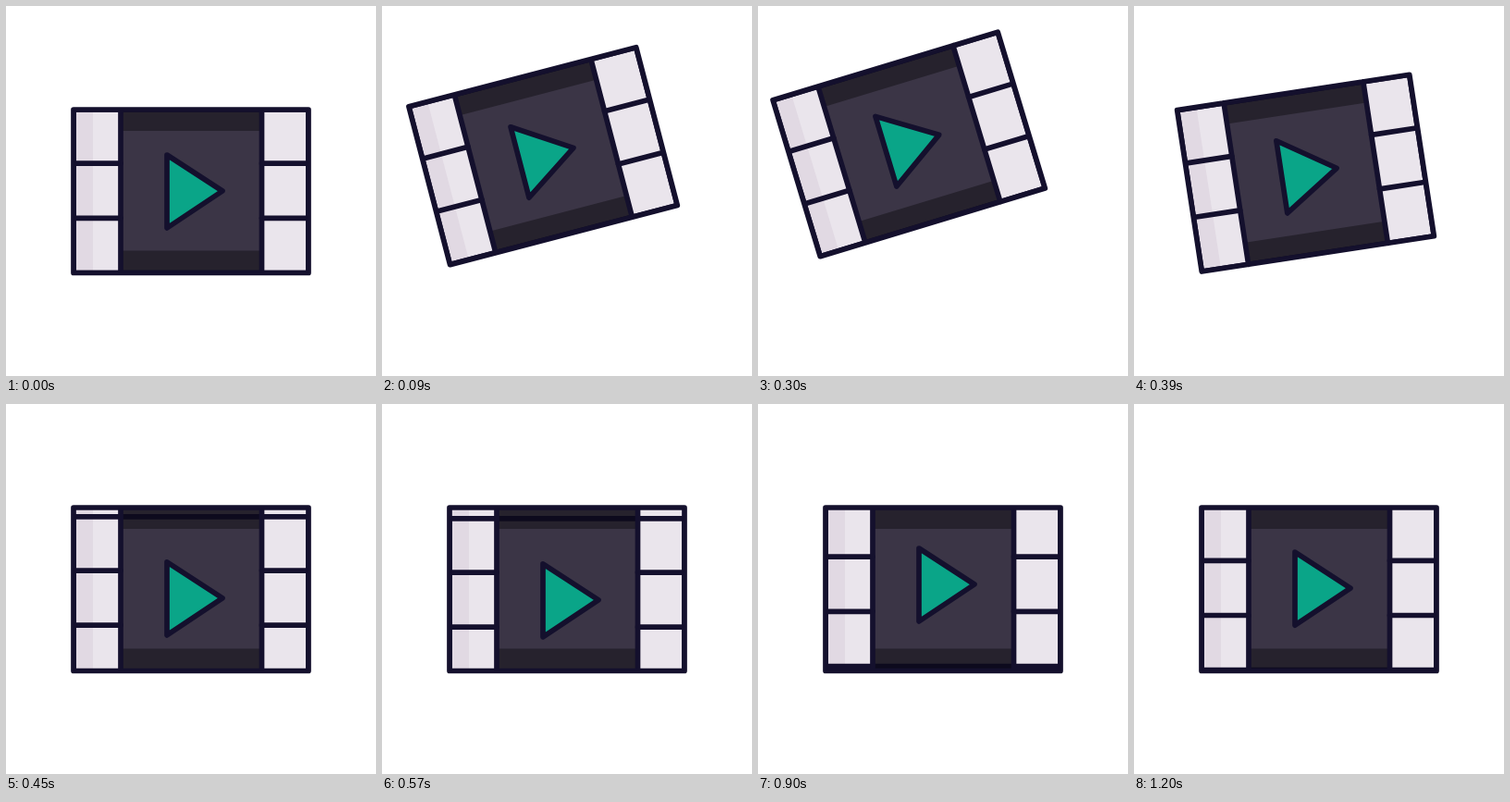
These frames come from a looping animation (400x400 px, 3.26 s). An HTML page:

```html
<!DOCTYPE html>
<html lang="en">
<head>
<meta charset="utf-8">
<title>Film clip</title>
<style>
  html, body { margin: 0; width: 100%; height: 100%; overflow: hidden; background: #fff; }
  svg { display: block; width: 100%; height: 100%; }
  .line { fill: none; stroke: #14102d; stroke-width: 5.7; stroke-linejoin: round; stroke-linecap: round; }
</style>
</head>
<body>
<svg viewBox="0 0 400 400">
  <defs>
    <clipPath id="window"><rect x="73" y="112" width="254" height="176.5"/></clipPath>
  </defs>
  <g id="clip">
    <rect x="73" y="112" width="254" height="176.5" fill="#eae5ec"/>
    <rect x="73" y="112" width="21" height="176.5" fill="#e1d9e3"/>
    <rect x="124" y="112" width="152.5" height="176.5" fill="#3b3546"/>
    <g clip-path="url(#window)">
      <g id="film">
        <path class="line" d="M73 112H327V288.5H73Z M73 170.2H124 M73 229.3H124 M276.5 170.2H327 M276.5 229.3H327"/>
        <path class="line" d="M174 161L234 200L174 240Z" style="fill:#0aa588"/>
      </g>
    </g>
    <path d="M124 112H276.5V135H124Z M124 264.5H276.5V288.5H124Z" fill="#000" fill-opacity=".36"/>
    <path class="line" d="M73 112H327V288.5H73Z M124 112V288.5 M276.5 112V288.5"/>
  </g>
</svg>
<script>
const LOOP = 3260, STEP = 30, LAST = 1200;
const clip = document.getElementById('clip');
const film = document.getElementById('film');

const clamp = u => Math.min(1, Math.max(0, u));
const smooth = u => u * u * (3 - 2 * u);
const outQuart = u => 1 - (1 - u) ** 4;

// Rises from 0 to 1 at the peak, then falls back to 0 at the end.
function toss(t, peak, end, upPower, downPower) {
  return t < peak
    ? 1 - ((peak - t) / peak) ** upPower
    : 1 - clamp((t - peak) / (end - peak)) ** downPower;
}

function tween(t, t0, t1, from, to, ease) {
  return from + (to - from) * ease(clamp((t - t0) / (t1 - t0)));
}

// The strip slides on after the landing and swings back.
function slide(t) {
  if (t < 550) return tween(t, 395, 550, 0, 12, outQuart);
  if (t < 900) return tween(t, 550, 900, 12, -5, smooth);
  return tween(t, 900, LAST, -5, -0.8, u => smooth(u ** 0.75));
}

function draw(ms) {
  const t = Math.min(LAST, Math.floor(ms / STEP) * STEP);
  const x = -41.2 * toss(t, 230, 425, 2, 2.2);
  const y = -58.3 * toss(t, 219, 425, 2, 2.2);
  const angle = -17.1 * toss(t, 235, 420, 4, 4);
  clip.setAttribute('transform', `translate(${x} ${y}) rotate(${angle} 200 200)`);
  film.setAttribute('transform', `translate(0 ${slide(t)})`);
}

const start = performance.now();
function tick() {
  draw((performance.now() - start) % LOOP);
  requestAnimationFrame(tick);
}
tick();
</script>
</body>
</html>
```
